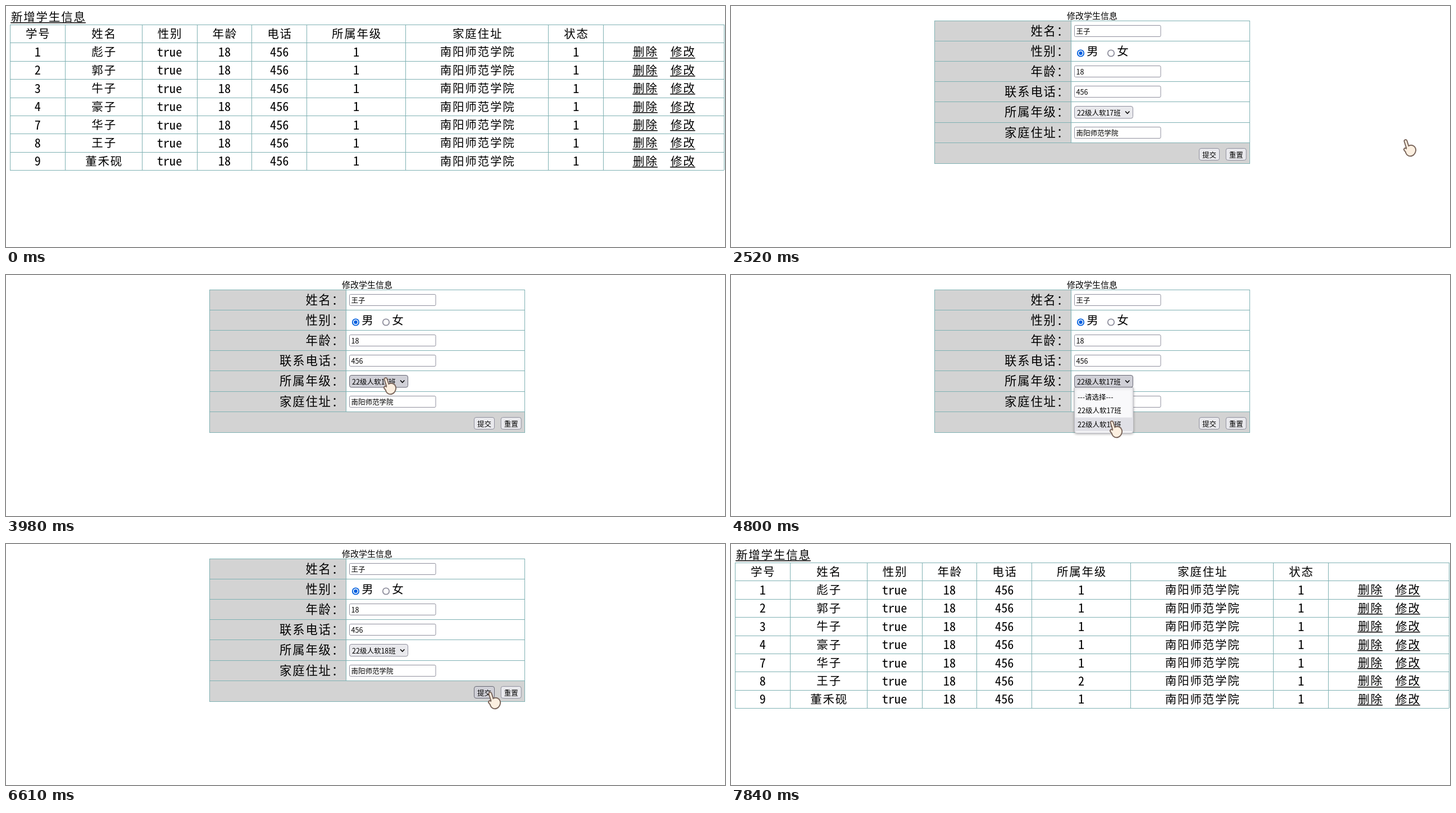
Write an HTML page with a canvas that moves like this. It is 1280 px wide and 429 px high and loops after 8 s.

```html
<!DOCTYPE html>
<html lang="zh-CN">
<head>
<meta charset="utf-8">
<title>学生信息</title>
<style>
html, body { margin: 0; width: 100%; height: 100%; overflow: hidden; background: #fff; }
canvas { display: block; width: 1280px; height: 429px; }
</style>
</head>
<body>
<canvas id="stage" width="1280" height="429"></canvas>
<script>
const ctx = document.getElementById('stage').getContext('2d');
const LOOP = 8000;
const MONO = '"Noto Sans Mono CJK SC", "Noto Sans CJK SC", "Noto Sans CJK", monospace';
const SANS = '"Noto Sans CJK SC", "Noto Sans CJK", sans-serif';
const LINE = '#7fb1b3', GREY = '#d3d3d3', EDGE = '#8f8f9d', EDGE_HOT = '#676774';
const BUTTON = '#e9e9ed', HOT = '#d0d0d7', ACTIVE = '#b1b1b9', BLUE = '#0060df';
const EM = 22.3;
const PHONE = '456', SCHOOL = '南阳师范学院';
const CLASSES = ['22级人软17班', '22级人软18班'];
const HEADS = ['学号', '姓名', '性别', '年龄', '电话', '所属年级', '家庭住址', '状态'];
const NAMES = ['彪子', '郭子', '牛子', '豪子', '华子', '王子', '董禾砚'];
const LABELS = ['姓名', '性别', '年龄', '联系电话', '所属年级', '家庭住址'];

// Column widths grow with the longest cell, counted in full-width characters
const COLS = [7];
for (const n of [2, 3, 2, 2, 2, 4, 6, 2, 5]) COLS.push(COLS.at(-1) + 19.6 + 39.1 * n);
const LEFT = 7, RIGHT = 1278;
const listY = i => 33 + 32.4 * i;
const formY = i => Math.floor(26 + 36.24 * i);
const buttonBox = i => [833.5 + 47.7 * i, 253.5, 36, 21];
const SELECT = [611.5, 178.5, 104, 21.5];

// Pointer moves: start, end, positions, bend of the curve, end point
const ORIGIN = [1236, 422];
const MOVES = [
  [200, 810, 9, [1240, 260], [1202, 238]],
  [2750, 2980, 4, [1010, 285], [821, 201]],
  [3200, 3980, 11, [735, 90], [677, 183]],
  [4500, 4800, 5, [677, 222], [679, 260]],
  [5580, 6220, 9, [770, 225], [863, 264]],
  [6980, 7750, 11, [1008, 334], [1201, 428]]
];

function text(str, x, cy, size, { align = 'left', weight = 400, font = SANS, gap = 0 } = {}) {
  ctx.font = `${weight} ${size}px ${font}`;
  ctx.letterSpacing = `${gap}px`;
  ctx.textAlign = align;
  ctx.fillStyle = '#000';
  ctx.fillText(str, x + gap / 2, cy + size * 0.38);
}

// Handwriting-like Chinese: small light glyphs on a wider pitch
function brush(str, x, cy, { em = EM, align = 'center', weight = 300 } = {}) {
  text(str, x, cy, em * 0.92, { align, weight, gap: em * 0.08 });
}

function cell(value, x, cy) {
  if (/[^\x00-\x7f]/.test(value)) brush(value, x, cy);
  else text(value, x, cy, EM, { align: 'center', font: MONO });
}

function link(str, x, cy) {
  const w = str.length * EM;
  brush(str, x, cy);
  ctx.fillRect(x - w / 2, Math.round(cy + 10), w, 1.5);
}

function line(x1, y1, x2, y2) {
  ctx.fillStyle = LINE;
  ctx.fillRect(Math.round(x1), Math.round(y1), Math.max(1, x2 - x1), Math.max(1, y2 - y1));
}

function box([x, y, w, h], radius, fill, edge) {
  ctx.beginPath();
  ctx.roundRect(x, y, w, h, radius);
  ctx.fillStyle = fill;
  ctx.fill();
  ctx.lineWidth = 1;
  ctx.strokeStyle = edge;
  ctx.stroke();
}

const inside = (p, [x, y, w, h]) =>
  !!p && p[0] >= x && p[0] <= x + w && p[1] >= y && p[1] <= y + h;

function pointerAt(t) {
  const i = MOVES.findLastIndex(m => t >= m[0]);
  if (i < 0 || t >= 7840) return null;
  const [start, end, count, bend, to] = MOVES[i];
  const from = i ? MOVES[i - 1][4] : ORIGIN;
  const step = Math.floor((t - start) / (end - start) * (count - 1) + 0.001) + 1;
  const p = Math.min(1, step / count), q = 1 - p;
  return to.map((v, k) => q * q * from[k] + 2 * p * q * bend[k] + p * p * v);
}

function drawList(edited) {
  const center = i => (COLS[i] + COLS[i + 1]) / 2 + 0.5;
  const rows = NAMES.length + 1;
  link('新增学生信息', 75, 19);
  for (let i = 0; i <= rows; i++) line(LEFT, listY(i), RIGHT, listY(i));
  COLS.forEach(x => line(x, listY(0), x, listY(rows)));
  HEADS.forEach((h, i) => brush(h, center(i), listY(0.5), { weight: 500 }));
  NAMES.forEach((name, r) => {
    const cy = listY(r + 1.5);
    const id = r < 4 ? r + 1 : r + 3;
    const grade = edited && id === 8 ? 2 : 1;
    [id, name, 'true', 18, PHONE, grade, SCHOOL, 1].forEach((v, i) => cell(String(v), center(i), cy));
    link('删除', center(8) - 1.5 * EM, cy);
    link('修改', center(8) + 1.5 * EM, cy);
  });
}

function dot(x, y, r) {
  ctx.beginPath();
  ctx.arc(x, y, r, 0, Math.PI * 2);
}

function radio(label, x, on) {
  const y = 84;
  ctx.fillStyle = ctx.strokeStyle = on ? BLUE : EDGE;
  ctx.lineWidth = 1.8;
  dot(x, y, 5.7);
  ctx.stroke();
  if (on) {
    dot(x, y, 3.2);
    ctx.fill();
  }
  brush(label, x + 21, 80.5);
}

function field(value, row) {
  const y = formY(row) + 8.5;
  box([611.5, y, 153.5, 20], 2, '#fff', EDGE);
  text(value, 614.5, y + 10.7, 12.5);
}

function button(label, rect, pointer, active) {
  const hot = inside(pointer, rect);
  box(rect, 3.5, active ? ACTIVE : hot ? HOT : BUTTON, hot ? EDGE_HOT : EDGE);
  text(label, rect[0] + rect[2] / 2, 265, 12.5, { align: 'center' });
}

function drawSelect(value, hot) {
  box(SELECT, 3.5, hot ? HOT : BUTTON, hot ? EDGE_HOT : EDGE);
  text(value, 616, 190, 12.5);
  ctx.beginPath();
  ctx.moveTo(702, 187.5);
  ctx.lineTo(705.7, 191.3);
  ctx.lineTo(709.4, 187.5);
  ctx.lineWidth = 1.5;
  ctx.strokeStyle = '#000';
  ctx.stroke();
}

function drawMenu(pointer, alpha) {
  const top = 205, row = 24.3;
  const hovered = pointer[1] < top ? 1 : Math.min(2, Math.floor((pointer[1] - top) / row));
  ctx.save();
  ctx.globalAlpha = alpha;
  ctx.shadowColor = 'rgba(0,0,0,.3)';
  ctx.shadowBlur = 4;
  ctx.shadowOffsetY = 1;
  box([611.5, 200.5, 104.5, 81], [0, 0, 4, 4], '#f9f9fb', '#bcbcc4');
  ctx.shadowColor = 'transparent';
  ctx.fillStyle = '#e0e0e6';
  ctx.fillRect(612, top + hovered * row, 104, row);
  ['---请选择---', ...CLASSES].forEach((s, i) => text(s, 617, top + (i + 0.5) * row, 12.5));
  ctx.restore();
}

function drawForm(t, pointer) {
  const open = t >= 4140 && t < 5270;
  const left = 362, split = 605, right = 923, top = formY(0), foot = formY(6), bottom = 280;
  text('修改学生信息', 643, 17, 15, { align: 'center' });
  ctx.fillStyle = GREY;
  ctx.fillRect(left, top, split - left, foot - top);
  ctx.fillRect(left, foot, right - left, bottom - foot);
  for (let i = 0; i <= 6; i++) line(left, formY(i), right, formY(i));
  line(left, bottom, right + 1, bottom);
  line(left, top, left, bottom);
  line(right, top, right, bottom);
  line(split, top, split, foot);
  LABELS.forEach((s, i) =>
    brush(s + '：', 602, formY(i) + 18.3, { em: 23.2, align: 'right', weight: 500 }));

  field('王子', 0);
  radio('男', 622.5, true);
  radio('女', 676.5, false);
  field('18', 2);
  field(PHONE, 3);
  drawSelect(CLASSES[t < 5270 ? 0 : 1], open || inside(pointer, SELECT));
  field(SCHOOL, 5);
  button('提交', buttonBox(0), pointer, t >= 6530 && t < 6610);
  button('重置', buttonBox(1), pointer);
  if (open) drawMenu(pointer, t < 4200 ? 0.5 : 1);
}

// Finger, thumb and palm as round strokes, first in brown, then smaller in cream
function drawHand([x, y]) {
  const limb = (x1, y1, x2, y2, width) => {
    ctx.beginPath();
    ctx.moveTo(x + x1, y + y1);
    ctx.lineTo(x + x2, y + y2);
    ctx.lineWidth = width;
    ctx.stroke();
  };
  ctx.save();
  ctx.lineCap = 'round';
  for (const [color, grow] of [['#7b675d', 2], ['#fcefe0', -2]]) {
    ctx.strokeStyle = color;
    limb(-1, 2.5, 3, 15, 5 + grow);
    limb(-1.5, 17.5, 4, 24, 5 + grow);
    limb(8.5, 18.5, 7.5, 20.5, 17.5 + grow);
  }
  ctx.restore();
}

function frame() {
  const t = performance.now() % LOOP;
  const pointer = pointerAt(t);
  ctx.fillStyle = '#fff';
  ctx.fillRect(0, 0, 1280, 429);
  if (t >= 2520 && t < 6770) drawForm(t, pointer);
  else drawList(t >= 6770);
  if (pointer) drawHand(pointer);
  requestAnimationFrame(frame);
}
frame();
</script>
</body>
</html>
```
